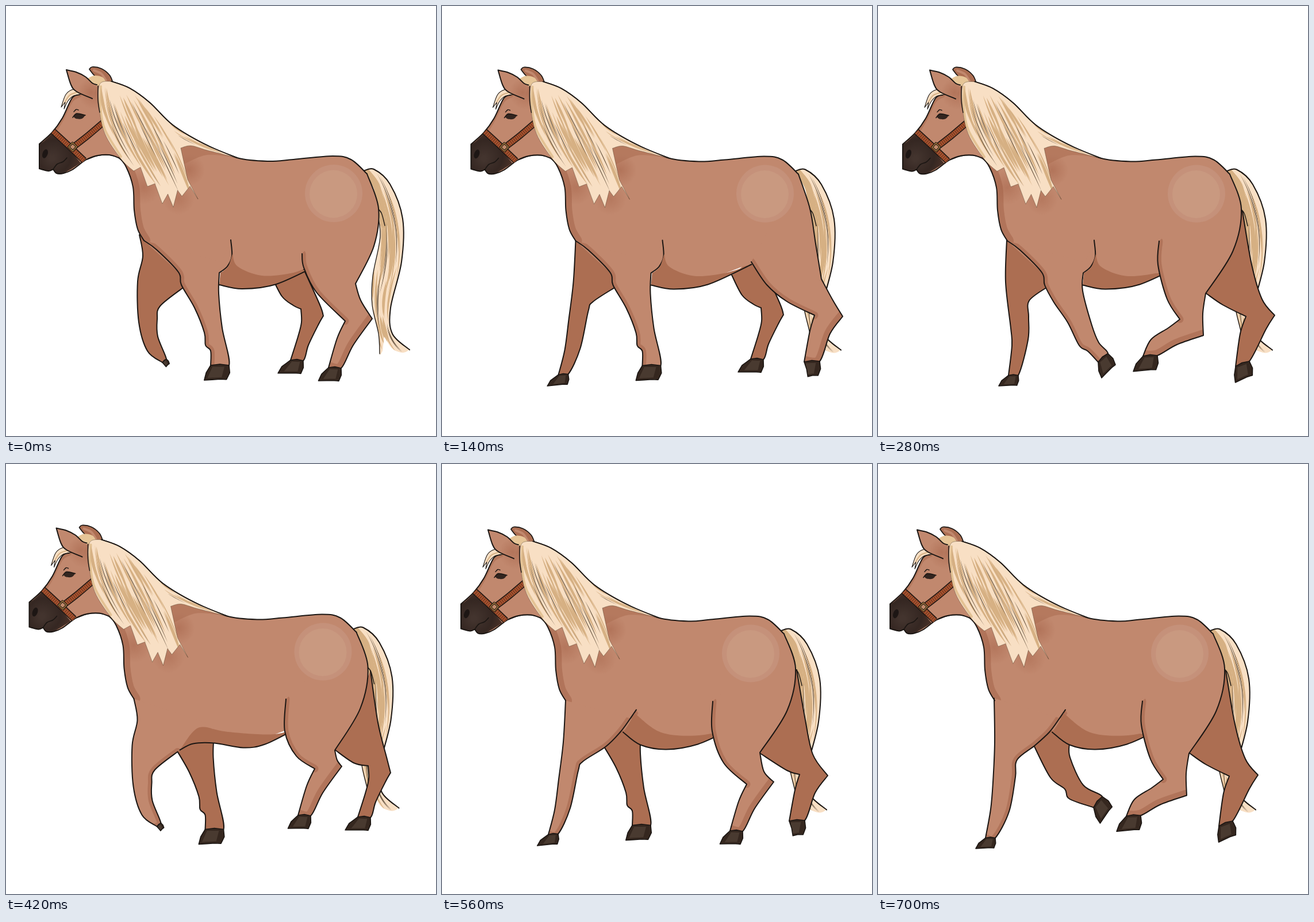
Recreate the animation shown at these times as an HTML page with a canvas. Size 748 by 748 pixels, loop 0.84 s.

```html
<!DOCTYPE html>
<html lang="en">
<head>
<meta charset="utf-8">
<title>Walking horse</title>
<style>
html, body { margin: 0; width: 100%; height: 100%; overflow: hidden; background: #fff; }
canvas { display: block; width: 100vmin; height: 100vmin; }
</style>
</head>
<body>
<canvas id="stage" width="748" height="748"></canvas>
<script>
const ctx = document.getElementById('stage').getContext('2d');
const STEP = 140;
const INK = '#1b1613', COAT = '#c1886e', SHADE = '#ac6e52', EDGE = '#b1745a';
const HAIR = '#f8dfc4', GOLD = '#d6b083';

// Outlines are smooth curves through key points; "|" marks a corner.
const CREST = '183,131 215,143 250,168 290,207 345,240 402,264';
const TOP = CREST + ' 455,270 500,267 568,261 600,267 628,292';
const CHEST = '240,408 229,388 223,355 221,315 209,280 196,264 180,259 160,260 140,267';
const TORSO = TOP + '|590,435|525,455|480,472|420,480|371,458|300,463|240,408|' + CHEST;
const CREASE = '240,408 262,424 300,463 ';
const ELBOW = '|385,453 393,435 391,407';
const SWEEP = ' 335,463 352,440 363,424';
const FORE_CAP = '|375,445', FAR_CAP = '|340,445';

const BELLY = {
  back: '371,485 411,492 470,484 546,449|500,464 445,469 403,453 394,431|386,454 373,464',
  level: '320,497 343,486 380,485 430,493 468,487 520,461|478,470 400,465 362,457 343,465 320,497',
  front: '340,463 370,485 415,493 470,484 525,459|465,469 405,463 360,430|351,447 341,462'
};

// Fore legs: front edge down to the ankle, back edge up, lean of the hoof.
const FORE = {
  stand: { front: '305,485 328,525 345,568 347,590 356,600 356,625', back: '388,625 376,560 370,500 371,464', lean: .35 },
  push: { front: '305,485 321,515 345,550 365,590 380,600 398,619', back: '415,604 399,585 387,555 371,495 372,464', lean: .6 },
  fold: { front: '309,488 337,542 362,562 370,579 412,594', back: '427,575 394,555 371,507 370,482', lean: .6 },
  lift: { front: '232,398 238,435 229,479 231,550 246,600 272,620', back: '279,614 264,575 263,545 268,522 308,490', lean: 0 },
  reach: { front: '240,408 236,480 228,545 221,598 210,641', back: '227,640 248,595 262,530 270,514 310,488', lean: 1.2 },
  land: { front: '239,406 237,480 246,560 248,590 242,642', back: '259,642 276,580 277,540 278,512 310,488', lean: 1 },
  tread: { front: '239,404 240,481 237,550 233,597 224,647', back: '241,647 265,601 276,541 279,511 310,486', lean: 1 }
};

// Lower hind legs, measured from the knee.
const SHIN = {
  stand: { front: '-14,30 -29,81', back: '-7,82 14,42 47,-4', lean: .75 },
  short: { front: '1,23 -5,48 -18,89', back: '4,90 13,63 30,28 39,12', lean: .95 },
  trail: { front: '-8,27 -18,81', back: '9,80 27,32 49,2', lean: -.2 },
  swing: { front: '-20,15 -50,35 -64,64', back: '-39,63 -5,44 41,28', lean: .72 },
  push: { front: '-10,30 -18,87', back: '6,78 35,22 50,-2', lean: .4 }
};

const parse = text => text.split(/[ |]/).map(p => p.split(',').map(Number));
const move = (text, dx, dy) => text.replace(/([-\d.]+),([-\d.]+)/g, (m, x, y) => `${+x + dx},${+y + dy}`);

const hind = (flank, shin, thigh) => {
  const knee = parse(flank).pop();
  const { front, back, lean } = SHIN[shin];
  return { front: flank + '|' + move(front, ...knee), back: move(back, ...knee) + '|' + thigh, lean };
};
const moved = (leg, dx, dy) => ({ ...leg, front: move(leg.front, dx, dy), back: move(leg.back, dx, dy) });

const swingHind = hind('489,409 487,450 503,510 525,545', 'swing', '565,535 570,500');
const reachFar = hind('462,470 480,505 500,521 513,527', 'short', '546,520 518,458|500,440');
const pushFar = hind('571,500 600,520 640,540', 'push', '668,510 650,450 634,357');

// x, y: place of the front; pull: extra shift of the hindquarters.
const poses = [
  { x: 0, y: 0, pull: 0, belly: 'back', fore: 'stand', farFore: 'lift',
    hind: hind('515,431 518,455 540,498 590,548', 'stand', '617,512 608,483'), farHind: reachFar },
  { x: -7.5, y: .5, pull: -.5, belly: 'back', fore: 'stand', farFore: 'reach',
    hind: hind('538,445 565,485 600,514 648,538', 'trail', '680,512 660,475'), farHind: moved(reachFar, 42, -2) },
  { x: -15, y: .5, pull: -1, belly: 'back', fore: 'push', farFore: 'land', hind: swingHind, farHind: pushFar },
  { x: -17.5, y: .5, pull: -1, belly: 'level', fore: 'lift', farFore: 'stand', reach: [8, 10],
    hind: hind('487,409 485,465 505,508 537,530', 'stand', '576,515 572,498'),
    farHind: hind('572,497 605,520 630,525', 'short', '662,510 647,450 634,360') },
  { x: -25, y: 3.5, pull: -8, belly: 'front', fore: 'reach', farFore: 'stand', elbow: SWEEP,
    hind: hind('471,413 470,465 490,520 530,557', 'stand', '560,535 553,502'),
    farHind: hind('553,503 600,533 622,540', 'trail', '645,505 631,440 617,358') },
  { x: -37, y: 3.5, pull: -8, belly: 'front', fore: 'tread', farFore: 'fold', elbow: SWEEP,
    hind: moved(swingHind, -29, 3.5), farHind: moved(pushFar, -29, 3) }
];

function trace(text, only = -1) {
  const path = new Path2D();
  let last = null;
  text.split('|').forEach((part, n) => {
    const pts = last ? [last, ...parse(part)] : parse(part);
    if (!last || n === only) path.moveTo(...pts[0]);
    last = pts[pts.length - 1];
    if (only >= 0 && n !== only) return;
    for (let i = 0; i < pts.length - 1; i++) {
      const b = pts[i], c = pts[i + 1], a = pts[i - 1] || b, d = pts[i + 2] || c;
      path.bezierCurveTo(b[0] + (c[0] - a[0]) / 6, b[1] + (c[1] - a[1]) / 6,
        c[0] - (d[0] - b[0]) / 6, c[1] - (d[1] - b[1]) / 6, c[0], c[1]);
    }
  });
  return path;
}

const bend = (text, pull) => text.replace(/([\d.]+),/g, (m, x) => (x > 480 ? +x + pull : x) + ',');

function fill(path, color) {
  ctx.fillStyle = color;
  ctx.fill(path);
}

function stroke(path, width = 2, color = INK) {
  ctx.lineWidth = width;
  ctx.strokeStyle = color;
  ctx.stroke(path);
}

function placed(dx, dy, draw) {
  ctx.save();
  ctx.translate(dx, dy);
  draw();
  ctx.restore();
}

function clipped(path, draw) {
  ctx.save();
  ctx.clip(path);
  draw();
  ctx.restore();
}

function spot(x, y, r, alpha) {
  const g = ctx.createRadialGradient(x, y, 0, x, y, r);
  g.addColorStop(0, `rgba(160,92,66,${alpha})`);
  g.addColorStop(1, 'rgba(160,92,66,0)');
  ctx.fillStyle = g;
  ctx.fillRect(x - r, y - r, 2 * r, 2 * r);
}

// The hoof hangs square below the ankle line and leans towards the toe.
function hoof(a, b, lean) {
  const u = [b[0] - a[0], b[1] - a[1]];
  const depth = Math.min(1.08, 26 / Math.hypot(...u));
  const spotAt = (along, down) => `${a[0] + u[0] * along - u[1] * down * depth},${a[1] + u[1] * along + u[0] * down * depth}`;
  const shape = corners => trace(corners.map(c => spotAt(...c)).join('|'));
  const path = shape([[0, 0], [.5, -.08], [1, 0], [1.04, .5], [.86, .95], [.5, .93], [-lean, 1], [-lean * .7, .5], [0, 0]]);
  fill(path, '#35271f');
  clipped(path, () => fill(shape([[.1, .1], [.75, .1], [.6, .8], [-lean * .5, .85]]), '#493a30'));
  stroke(path, 1.6);
}

function leg({ front, back, lean }, color, { pre = '', post = '', cap = '', shaded = [] } = {}) {
  const line = pre + front + '|' + back + post;
  const path = trace(line + cap);
  const down = parse(front), up = parse(back);
  fill(path, color);
  clipped(path, () => shaded.forEach(([n, width]) => stroke(trace(line, n), width, EDGE)));
  stroke(trace(line));
  hoof(down.pop(), up[0], lean);
}

function belly(text) {
  fill(trace(text), SHADE);
  stroke(trace(text, 0));
}

// The rump swells from the crotch up to the root of the tail.
function rump(thigh, x, y) {
  const [cx, cy] = parse(thigh).pop();
  const bulge = 8 + .2 * (x - cx);
  return `|${(cx + x + 20) / 2 + bulge},${(cy + y + 60) / 2} ${x + 20},${y + 60} ${x},${y}`;
}

function randomFrom(seed) {
  return () => (seed = (seed * 16807) % 2147483647) / 2147483647;
}

const quad = ([a, b, c], t) => [0, 1].map(k =>
  (1 - t) ** 2 * a[k] + 2 * t * (1 - t) * b[k] + t * t * c[k]);

// Tapered hairs run between two guiding curves.
function strands(left, right, count, seed) {
  const rnd = randomFrom(seed), steps = 10;
  for (let i = 0; i < count; i++) {
    const u = (i * .618) % 1, from = rnd() * .6, to = Math.min(1, from + .3 + rnd() * .25);
    const dark = i % 4 === 3, wide = dark ? .55 : 1 + rnd() * 1.8;
    const hair = new Path2D();
    for (let k = 0; k <= 2 * steps; k++) {
      const t = from + (to - from) * (k > steps ? 2 * steps - k : k) / steps;
      const a = quad(left, t), b = quad(right, t);
      const half = wide * Math.sin(Math.PI * k / steps);
      hair.lineTo(a[0] + (b[0] - a[0]) * u + half, a[1] + (b[1] - a[1]) * u);
    }
    fill(hair, dark ? '#4a3826' : GOLD);
  }
}

function tail() {
  const right = '622,287 640,284 668,310 690,370 688,445 669,525 672,570 702,598';
  const left = '650,605 648,570 637,520 638,470 651,400 644,350';
  const path = trace(right + '|690,603 672,596 658,575|655,600|' + left + '|640,318 622,287');
  fill(path, HAIR);
  clipped(path, () => {
    stroke(trace('626,288 644,312 653,350 657,380'), 12, GOLD);
    strands([[626, 286], [672, 370], [640, 490]], [[650, 290], [712, 390], [668, 530]], 20, 91);
    strands([[640, 450], [632, 540], [654, 602]], [[684, 450], [640, 570], [700, 604]], 16, 17);
  });
  stroke(trace(right));
  stroke(trace(left), 1.3);
  stroke(trace('644,350 653,360 659,382'), 1.4);
}

function mane(torso) {
  const tips = parse('334,336 306,331 291,350 272,344 246,314 222,287');
  const locks = tips.map(([x, y], i) => {
    const next = tips[i + 1];
    return `${x},${y}` + (next ? `|${(x + next[0]) / 2},${(y + next[1]) / 2 - 20}` : '');
  }).join('|');
  const path = trace(CREST + '|350,251 322,243 304,247|316,302|' + locks + '|200,266 172,222 162,175 163,136 183,131');
  clipped(torso, () => {
    spot(318, 285, 28, .45);
    spot(240, 315, 30, .4);
    spot(300, 335, 28, .35);
    fill(trace('300,242 322,240 402,264|350,259 310,275'), 'rgba(172,110,82,.55)');
  });
  fill(path, HAIR);
  clipped(path, () => {
    stroke(trace('165,140 164,175 172,215 200,262'), 4, '#e3c294');
    strands([[166, 138], [164, 215], [240, 305]], [[235, 158], [300, 235], [328, 332]], 48, 4321);
    strands([[285, 204], [315, 232], [395, 264]], [[284, 214], [305, 238], [390, 264]], 6, 55);
  });
  stroke(path, .7, 'rgba(60,42,26,.55)');
}

function strap(text) {
  const path = trace(text);
  ctx.lineCap = 'butt';
  stroke(path, 11.5);
  stroke(path, 8.5, '#a65330');
  ctx.setLineDash([1, 2.6]);
  stroke(path, 8.5, '#6b3019');
  ctx.setLineDash([]);
  ctx.lineCap = 'round';
}

function muzzle() {
  const path = trace('80,222 66,235 58,240|58,283|74,287 82,284|88,291 100,291 130,273|104,243 80,222');
  const tone = ctx.createRadialGradient(80, 265, 4, 86, 260, 50);
  tone.addColorStop(0, '#43342e');
  tone.addColorStop(.55, '#352722');
  tone.addColorStop(1, '#503429');
  fill(path, tone);
  const nostril = new Path2D();
  nostril.ellipse(68, 257, 4.5, 8, .35, 0, 7);
  fill(nostril, '#1d1614');
  stroke(trace('82,284 89,275 99,271 106,264'), 1.6);
}

function head() {
  const farEar = trace('145,110 150,106 166,109 180,120 186,133|165,130 153,120 145,110');
  fill(farEar, SHADE);
  stroke(farEar, 1.7);
  stroke(trace('153,112 166,118 174,130'), 4, COAT);

  const face = '128,154 115,160 98,195 80,220 58,240|58,283|74,287 82,284|88,291 100,291 115,285 140,267 160,260 180,259 196,264';
  const skin = trace(face + '|200,200|186,132|150,128|128,154');
  fill(skin, COAT);
  clipped(skin, () => {
    spot(154, 150, 30, .45);
    stroke(trace('128,155 113,165 98,195 82,222'), 7, 'rgba(172,110,82,.6)');
  });
  muzzle();
  stroke(trace(face));

  strap('82,218 108,242 136,269');
  strap('116,246 143,225 170,202');
  placed(116, 245, () => {
    ctx.rotate(.75);
    const buckle = new Path2D();
    buckle.rect(-5, -5, 10, 10);
    fill(buckle, '#c18a6a');
    stroke(buckle, 3.5);
    stroke(buckle, 1.6, '#a5793f');
  });

  fill(trace('117,192 124,187 138,190|132,196 122,196 117,192'), '#33251f');
  stroke(trace('116,194 123,187 138,190'), 1.6);
  stroke(trace('118,184 122,180 126,181'), 1.4);

  fill(trace('142,126 154,121 168,124 175,134|155,139 142,126'), '#e6c597');
  const lock = trace('134,148 117,145 104,154 96,176|103,167|101,179|108,165 118,156 134,153');
  fill(lock, HAIR);
  stroke(lock, 1.1);
  stroke(trace('124,150 111,155 103,166'), 2, GOLD);

  const earLine = '150,161 123,149 113,137 105,111|122,115 138,123 150,134 158,137';
  const ear = trace(earLine);
  fill(ear, COAT);
  clipped(ear, () => spot(148, 150, 24, .45));
  stroke(ear);
}

function draw({ x, y, pull, reach = [0, 0], elbow, ...pose }) {
  ctx.fillStyle = '#fff';
  ctx.fillRect(0, 0, 748, 748);
  ctx.lineCap = ctx.lineJoin = 'round';
  const torso = trace(bend(TORSO, pull));
  const behind = pose.belly === 'back';

  placed(x + pull, y, tail);
  leg(pose.farHind, SHADE);
  placed(x + reach[0], y + reach[1], () => leg(FORE[pose.farFore], SHADE, { cap: FAR_CAP, post: FAR_CAP }));

  placed(x, y, () => {
    fill(torso, COAT);
    clipped(torso, () => stroke(trace(CHEST), 22, EDGE));
  });
  placed(x + reach[0], y + reach[1], () => leg(FORE[pose.fore], COAT, {
    pre: behind ? CREASE : '', post: behind ? ELBOW : elbow, cap: FORE_CAP, shaded: [[behind ? 0 : 1, 13]]
  }));
  placed(x, y, () => belly(BELLY[pose.belly]));
  leg(pose.hind, COAT, { post: rump(pose.hind.back, 628 + x + pull, 292 + y), shaded: [[0, 13], [2, 20]] });

  placed(x, y, () => {
    const ring = (cx, cy, r, color) => {
      const disc = new Path2D();
      disc.arc(cx + pull, cy, r, 0, 7);
      fill(disc, color);
    };
    ring(570, 326, 50, '#c5917a');
    ring(569.5, 327, 41.5, '#c99980');
    stroke(trace(bend(TOP, pull)));
    stroke(trace(CHEST));
    head();
    mane(torso);
    stroke(trace(CREST), 1.8);
    stroke(trace('160,139 160,165 163,185'), 1.4);
  });
}

let shown = -1;
function tick(now) {
  const n = Math.floor(now / STEP) % poses.length;
  if (n !== shown) draw(poses[shown = n]);
  requestAnimationFrame(tick);
}
draw(poses[shown = 0]);
requestAnimationFrame(tick);
</script>
</body>
</html>
```
